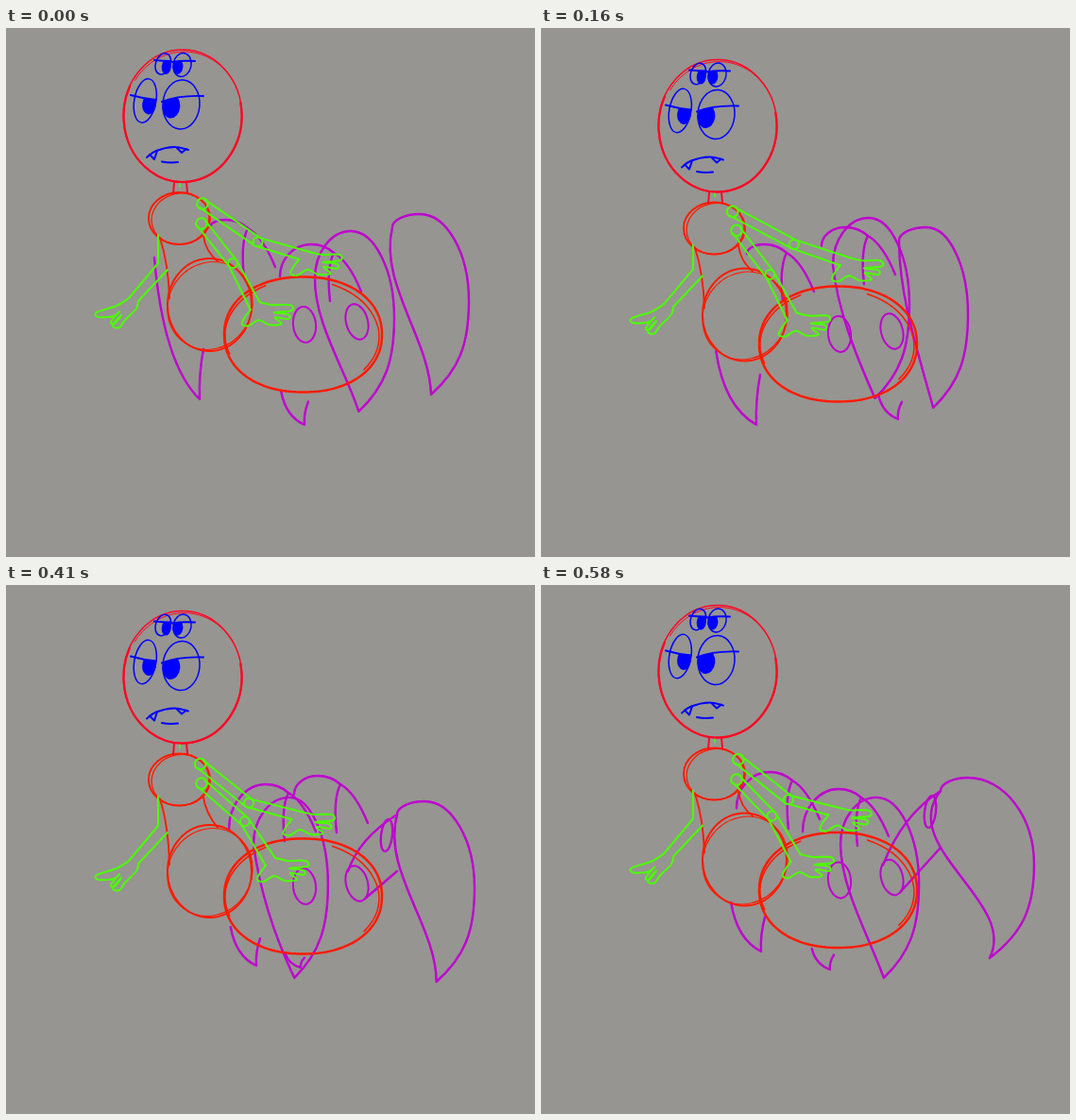
An HTML page with a canvas that plays this animation: 560x560 px, repeating every 0.66 s.

```html
<!DOCTYPE html>
<html lang="en">
<head>
<meta charset="utf-8">
<title>Spider walk</title>
<style>
html, body { margin: 0; width: 100%; height: 100%; overflow: hidden; background: #969591; }
canvas { display: block; width: 560px; height: 560px; }
</style>
</head>
<body>
<canvas id="stage" width="560" height="560"></canvas>
<script>
const ctx = document.getElementById('stage').getContext('2d');
const LOOP = 660;
const STARTS = [0, 80, 160, 250, 330, 410, 500, 580];
const STEPS = STARTS.length;
const KEYED = [0, 2, 3, 5, 6, 7];
const COLOR = { paper: '#969591', head: '#ff0624', body: '#ff1a00', arm: '#4cff00', leg: '#bf00d0', face: '#0000ff' };

const nums = s => s.trim().split(/\s+/).map(Number);

// A value held at the keyed steps, linear between them.
function keys(s) {
  const values = nums(s);
  return step => {
    const i = KEYED.filter(k => k <= step).length - 1, next = (i + 1) % KEYED.length;
    const span = (KEYED[next] - KEYED[i] + STEPS) % STEPS;
    return values[i] + (values[next] - values[i]) * (step - KEYED[i]) / span;
  };
}

// A value swinging once per loop, highest at the step `peak`.
const swing = (mid, amount, peak) => step => mid + amount * Math.cos((step - peak) * 2 * Math.PI / STEPS);

const tracks = {
  top: keys('0 10.5 12 4.5 2.5 -1.5'),
  belly: keys('0 10.5 13 10 5.5 -2.5'),
  abdomen: keys('0 10 12.5 5 -4.5 -1.5'),
  upperArm: [swing(263, 6, 1.2), swing(229, 2.5, 4), swing(353, 8, 1.8), swing(248, 4.5, 3)],
  lowerArm: [swing(246, 7, 4.7), swing(253, 9, 2.6), swing(310, 9, 4.8), swing(301, 9, 2.4)],
  // crest x, crest y, width
  near: [keys('365 347 325 300 332 355'), swing(215, 14, 6), swing(43, 3, 0)],
  rear: [keys('438 408 415 443 455 452'), keys('197 211 217 229 213 204'), keys('52 44 45 53 69 70')],
  frontArch: [keys('232 236 245 275 262 242'), keys('203 229 227 211 203 198'), keys('16 18 27 39 39 35')],
  midArch: [keys('323 322 377 330 325 315'), keys('229 211 208 202 206 216'), keys('33 25 27 25 27 38')],
  // tip x, tip y, visible height
  frontClaw: [keys('205 228 237 265 251 233'), keys('393 420 418 403 393 388'), keys('150 78 64 41 48 52')],
  midClaw: [keys('316 378 375 312 320 306'), keys('420 414 405 405 398 407'), keys('35 26 17 15 18 22')]
};

function pose(step) {
  const at = track => Array.isArray(track) ? track.map(f => f(step)) : track(step);
  return Object.fromEntries(Object.entries(tracks).map(([name, track]) => [name, at(track)]));
}

function pen(color, width) {
  ctx.strokeStyle = ctx.fillStyle = color;
  ctx.lineWidth = width;
}

const path = d => ctx.stroke(new Path2D(d));

// Quarter of an ellipse; leaves the first point vertically if `upright`.
function quarter(x0, y0, x1, y1, upright) {
  const k = 0.55, dx = (x1 - x0) * k, dy = (y1 - y0) * k;
  return upright
    ? `C${x0} ${y0 + dy} ${x1 - dx} ${y1} ${x1} ${y1}`
    : `C${x0 + dx} ${y0} ${x1} ${y1 - dy} ${x1} ${y1}`;
}

// Smooth line through a few points.
function curve(s, ox = 0, oy = 0) {
  const p = nums(s), n = p.length / 2;
  const X = i => p[2 * Math.max(0, Math.min(n - 1, i))] + ox;
  const Y = i => p[2 * Math.max(0, Math.min(n - 1, i)) + 1] + oy;
  let d = `M${X(0)} ${Y(0)}`;
  for (let i = 0; i < n - 1; i++) {
    d += `C${X(i) + (X(i + 1) - X(i - 1)) / 6} ${Y(i) + (Y(i + 1) - Y(i - 1)) / 6}`
      + ` ${X(i + 1) - (X(i + 2) - X(i)) / 6} ${Y(i + 1) - (Y(i + 2) - Y(i)) / 6} ${X(i + 1)} ${Y(i + 1)}`;
  }
  path(d);
}

function oval(x, y, rx, ry, tilt = 0, from = 0, to = 2 * Math.PI) {
  ctx.beginPath();
  ctx.ellipse(x, y, rx, ry, tilt, from, to);
  ctx.stroke();
}

// Oval with slightly squared shoulders.
function plump(x, y, rx, ry, power) {
  const bend = v => Math.sign(v) * Math.abs(v) ** (2 / power);
  ctx.beginPath();
  for (let a = 0; a < 2 * Math.PI; a += 0.05) ctx.lineTo(x + rx * bend(Math.cos(a)), y + ry * bend(Math.sin(a)));
  ctx.closePath();
  ctx.stroke();
}

function shifted(y, draw) {
  ctx.save();
  ctx.translate(0, y);
  draw();
  ctx.restore();
}

// Sickle leg: root, crest, outer side, tip, then a bent inner edge back.
function sickle([x, y, w], rootX, rootY) {
  const h = 191, lean = 6 + 0.6 * (w - 42), bend = 2 * Math.max(0, w - 42);
  const rx = x - rootX, ry = y + rootY;
  const sx = x + w, sy = y + 0.48 * h;
  const tx = x + lean, ty = y + h;
  const dx = (tx - rx) / 3, dy = (ty - ry) / 3;
  path(`M${rx} ${ry}` + quarter(rx, ry, x, y, true) + quarter(x, y, sx, sy)
    + `C${sx} ${sy + 0.24 * h} ${tx + 0.75 * (w - lean)} ${ty - 0.14 * h} ${tx} ${ty}`
    + `C${rx + 2 * dx + bend - 8} ${ry + 2 * dy} ${rx + dx - bend - 8} ${ry + dy} ${rx} ${ry}`);
  return [rx, ry];
}

// Lower end of a leg that shows below the body.
function claw([x, y, h]) {
  const w = Math.min(10 + 0.42 * h, 48), back = Math.min(0.7 * h, 53);
  path(`M${x - w} ${y - h}Q${x - 0.8 * w} ${y - 0.25 * h} ${x} ${y}Q${x - 1} ${y - back / 2} ${x + 4} ${y - back}`);
}

// Raised knee of a leg on the far side.
function arch([x, y, w]) {
  const rise = w * w / 32;
  path(`M${x - w} ${y + rise}` + quarter(x - w, y + rise, x, y, true)
    + `Q${x + 14} ${y} ${x + 24} ${y + 9}Q${x + 40} ${y + 18} ${x + 53} ${y + 50}`);
  path(`M${x + 24} ${y + 9}Q${x + 16} ${y + 25} ${x + 20} ${y + 60}`);
}

function drawLegs(p) {
  claw(p.frontClaw);
  claw(p.midClaw);
  arch(p.frontArch);
  arch(p.midArch);
  sickle(p.near, 38, 50);
  const [x, y] = sickle(p.rear, 29, 14);
  // the thigh shows only while the leg reaches back
  if (x > 411) {
    path(`M362 ${298 + p.abdomen}Q${x - 40} ${y + 25} ${x} ${y}`);
    path(`M380 ${327 + p.abdomen}L${x} ${y + 60}`);
    oval(x - 11, y + 22, 6, 17, 0.12);
  }
}

function drawAbdomen() {
  pen(COLOR.leg, 2);
  oval(316, 314, 12, 19, -0.1);
  oval(371.5, 311, 11.5, 19, -0.25);
  pen(COLOR.body, 2.5);
  plump(314.5, 324.5, 83.5, 61, 2.15);
  pen(COLOR.body, 1.5);
  oval(313, 325, 82, 59, 0.05, -1.2, 0.6);
  oval(316, 325, 84, 60, 0, 2.8, 4.2);
}

function drawBelly() {
  pen(COLOR.body, 1.9);
  oval(215.5, 293, 44.5, 49);
  pen(COLOR.body, 1.2);
  oval(216, 294, 44, 47.5, 0.6);
}

function drawTorso(top, belly) {
  pen(COLOR.body, 1.9);
  path(`M163 ${222 + top}Q172 ${250 + top} 173 ${286 + belly}`);
  path(`M209 ${220 + top}Q211 ${236 + top} 224 ${247 + belly}`);
  shifted(top, () => {
    oval(183.5, 201.5, 32.5, 27.5);
    pen(COLOR.body, 1.3);
    oval(184.5, 202, 30.5, 27, -0.2);
    pen(COLOR.head, 2);
    path('M178 164L177 175M191 163L192 174');
    pen(COLOR.arm, 1.5);
    path('M184 163V168');
  });
}

function drawHead() {
  pen(COLOR.head, 1.5);
  oval(187, 93, 62.7, 70);
  pen(COLOR.head, 2.3);
  oval(187, 93, 62.5, 70, 0, -0.2, 3.6);
  pen(COLOR.head, 1);
  oval(188, 94, 62.5, 69, 0.04, 3.7, 5.7);
}

// Half-closed eye: outline, pupil cut off by the lid, lid stroke.
function eye(x, y, rx, ry, tilt, px, py, pw, ph, lid) {
  pen(COLOR.face, 1.5);
  oval(x, y, rx, ry, tilt);
  const [x0, y0, cx, cy, x1, y1] = nums(lid);
  const d = `M${x0} ${y0}Q${cx} ${cy} ${x1} ${y1}`;
  ctx.save();
  ctx.clip(new Path2D(d + 'V160H' + x0 + 'Z'));
  ctx.beginPath();
  ctx.ellipse(px, py, pw, ph, 0.1, 0, 7);
  ctx.fill();
  ctx.restore();
  pen(COLOR.face, 2);
  path(d);
}

function drawFace() {
  eye(147.3, 77, 11.5, 23.5, 0.18, 151.5, 81, 7.3, 10.5, '132 71 146 75 159 76');
  eye(185.5, 81, 19.5, 26, 0.08, 175, 83, 9.3, 12.5, '165 78 182 71 209 72');
  eye(166.3, 38, 7.8, 11.5, 0.35, 169.8, 41, 5, 8, '157 34 166 35 175 35');
  eye(186.5, 39, 9.5, 12.5, 0.2, 182, 41, 5.4, 8, '176 36 186 34 200 35');
  pen(COLOR.face, 2);
  curve('149 137 159 130 178 126 193 129');
  path('M165 141.5Q173 143 182 142');
  path('M152 134L157 139L160 130M181 127L186 132L191 128');
}

function drawLeftArm(top, y) {
  path(`M161 ${219 + top}V${249 + y}L130 ${286 + y}M140 ${289 + y}L171 ${256 + y}`);
  curve('130 286 117 294 96 301 98 306 114 305 120 300 111 311 115 313 122 304 113 315 120 317 126 309 138 297 140 289', 0, y);
}

const HAND = '-34 -8 -21 -5 -2 -5 0 1 -19 3 -4 5 -4 10 -18 8 -11 15 -24 16 -35 11 -46 17 -53 15 -50 8 -44 0';

function drawArm(sx, sy, [ex, ey, hx, hy]) {
  const len = Math.hypot(ex - sx, ey - sy);
  const nx = (ey - sy) / len * 5, ny = (sx - ex) / len * 5;
  oval(sx, sy, 5.8, 5.8);
  oval(ex, ey, 5, 5);
  path(`M${sx + nx} ${sy + ny}L${ex + nx} ${ey + ny}L${hx - 34} ${hy - 8}`);
  path(`M${sx - nx} ${sy - ny}L${ex - nx} ${ey - ny}L${hx - 44} ${hy}`);
  curve(HAND, hx, hy);
}

function draw(p) {
  const { top, belly, abdomen } = p;
  ctx.fillStyle = COLOR.paper;
  ctx.fillRect(0, 0, 560, 560);
  pen(COLOR.leg, 2.4);
  drawLegs(p);
  shifted(abdomen, drawAbdomen);
  shifted(belly, drawBelly);
  drawTorso(top, belly);
  shifted(top, drawHead);
  pen(COLOR.arm, 2);
  drawLeftArm(top, 0.6 * belly);
  drawArm(208 - 0.5 * top, 186 + 0.8 * top, p.upperArm);
  drawArm(207, 207 + 0.7 * top, p.lowerArm);
  shifted(top, drawFace);
}

ctx.lineCap = ctx.lineJoin = 'round';
const poses = STARTS.map((_, step) => pose(step));
const begin = performance.now();

function tick() {
  const t = (performance.now() - begin) % LOOP;
  draw(poses[STARTS.filter(s => s <= t).length - 1]);
  requestAnimationFrame(tick);
}
tick();
</script>
</body>
</html>
```
